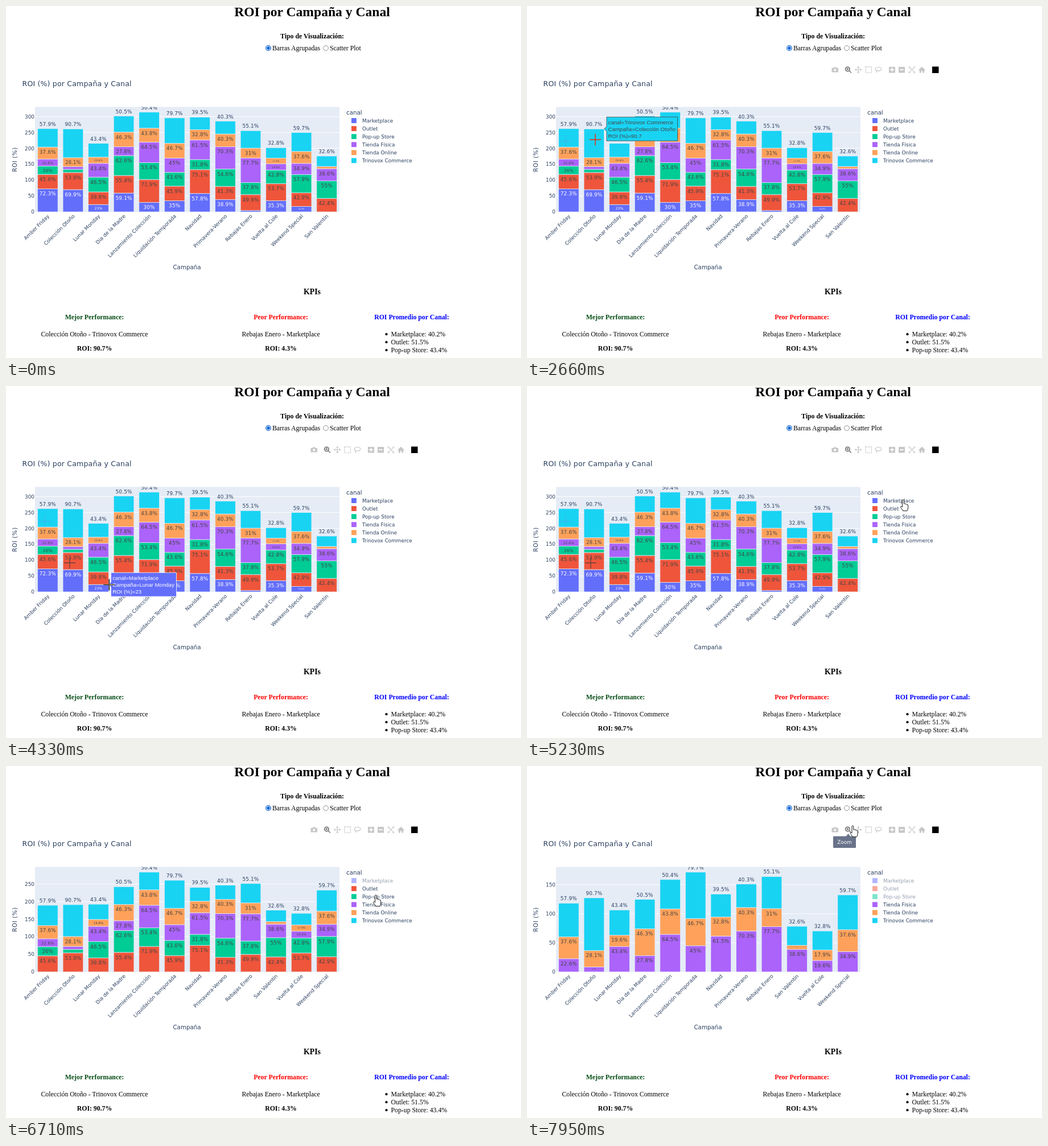
An HTML page for the animation above (8000 ms loop, 905 by 619 pixels).

```html
<!DOCTYPE html>
<html lang="es">
<head>
<meta charset="utf-8">
<title>ROI por Campaña y Canal</title>
<style>
  html, body { margin: 0; width: 100%; height: 100%; overflow: hidden; background: #fff; }
  svg { display: block; width: 905px; height: 619px; }
  .serif { font: 11.8px "Liberation Serif", serif; fill: #000; }
  .bold { font-weight: bold; }
  .h1 { font-size: 23.6px; }
  .h3 { font-size: 13.8px; }
  .plot { font: 8.85px "DejaVu Sans", sans-serif; fill: #2a3f5f; }
  .title { font-size: 12.54px; letter-spacing: .014em; }
  .axis { font-size: 10.3px; }
  .value { letter-spacing: .02em; }
  .tip { font: 9.6px "Liberation Sans", sans-serif; }
  .mid { text-anchor: middle; }
  .end { text-anchor: end; }
  #cross { mix-blend-mode: difference; }
</style>
</head>
<body>
<svg id="stage" viewBox="0 0 905 619">
  <defs><clipPath id="area"><rect x="51" y="177.5" width="535" height="184.5"/></clipPath></defs>
  <rect width="905" height="619" fill="#fff"/>

  <g class="serif">
    <text class="bold h1 mid" x="538" y="18">ROI por Campaña y Canal</text>
    <text class="bold mid" x="538" y="57">Tipo de Visualización:</text>
    <circle cx="461" cy="74" r="4.3" fill="#fff" stroke="#0b62d2" stroke-width="1.2"/>
    <circle cx="461" cy="74" r="2.7" fill="#0b62d2"/>
    <text x="468" y="78">Barras Agrupadas</text>
    <circle cx="562" cy="74" r="4.4" fill="#fff" stroke="#767676" stroke-width=".8"/>
    <text x="569" y="78">Scatter Plot</text>
    <text class="bold h3 mid" x="538" y="507">KPIs</text>
    <text class="bold mid" x="155.5" y="551" fill="#064d16">Mejor Performance:</text>
    <text class="mid" x="155.5" y="580.5">Colección Otoño - Trinovox Commerce</text>
    <text class="bold mid" x="155.5" y="606">ROI: 90.7%</text>
    <text class="bold mid" x="483" y="551" fill="#f00">Peor Performance:</text>
    <text class="mid" x="483" y="580.5">Rebajas Enero - Marketplace</text>
    <text class="bold mid" x="483" y="606">ROI: 4.3%</text>
    <text class="bold mid" x="713" y="551" fill="#00f">ROI Promedio por Canal:</text>
    <g id="means"></g>
  </g>

  <g class="plot">
    <text class="title" x="28.5" y="140.5">ROI (%) por Campaña y Canal</text>
    <text class="axis mid" x="318" y="463">Campaña</text>
    <text class="axis mid" transform="translate(18.5 270) rotate(-90)" letter-spacing=".6">ROI (%)</text>
    <text class="axis" x="598" y="191">canal</text>
  </g>
  <rect x="51" y="177.5" width="535" height="184.5" fill="#e5ecf6"/>
  <g id="charts" class="plot"></g>
  <g id="legend" class="plot"></g>

  <g fill="none" stroke-width="1.3">
    <path id="trailA" d="M58 238h20M68 228v20" stroke="#3fb4ea" stroke-dasharray="4 1.5"/>
    <path id="trailB" d="M102 311h20M112 301v20" stroke="#3c3c3c" opacity=".75"/>
  </g>

  <g id="modebar" fill="none" stroke="#444" stroke-opacity=".3" stroke-width="1.4">
    <path d="M535.5 109h3l1-1.5h3.5l1 1.5h3v7.5h-11.5z" fill="#444" fill-opacity=".3" stroke="none"/>
    <circle cx="541.2" cy="112.5" r="2.2" fill="#fff" stroke="#bbb" stroke-width="1"/>
    <g stroke-opacity=".75" stroke-width="1.7">
      <circle cx="563.4" cy="111" r="3.7"/>
      <path d="M566.2 113.8l3.6 3.8M561.6 111h3.6M563.4 109.2v3.6" stroke-width="1.4"/>
    </g>
    <path d="M577 112h10.5M582.2 106.8v10.5M580.6 108.4l1.6-1.8 1.6 1.8M580.6 115.7l1.6 1.8 1.6-1.8M578.6 110.4l-1.8 1.6 1.8 1.6M585.8 110.4l1.8 1.6-1.8 1.6" stroke-width="1.2"/>
    <rect x="595" y="107" width="10.4" height="10.4" stroke-dasharray="2 1.3"/>
    <path d="M614 113.8c-3.5-2-1.5-6.3 3.6-6.3 6.8 0 6.5 5.8 1 6.6-2 .3-4-.8-4.6-.3-.8 1.3 1.5 1.5.4 3.7" stroke-width="1.2"/>
    <g fill="#444" fill-opacity=".3" stroke="none">
      <path fill-rule="evenodd" d="M636 107h11v10.5h-11zM640.6 108.8v2.5h-2.6v1.8h2.6v2.5h1.8v-2.5h2.6v-1.8h-2.6v-2.5z"/>
      <path fill-rule="evenodd" d="M653 107h11v10.5h-11zM655.2 111.3v1.8h6.6v-1.8z"/>
      <path d="M688 112.5l6-5.7 6 5.7-1 .8-.8-.7v4.9h-3v-3.3h-2.4v3.3h-3v-4.9l-.8.7z"/>
    </g>
    <path d="M671.5 109.5v-2.5h2.5M679 107h2.5v2.5M681.5 114.8v2.5h-2.5M674 117.3h-2.5v-2.5M673 108.5l7 7.2M680 108.5l-7 7.2" stroke-width="1.2"/>
    <rect x="712" y="106.5" width="11.5" height="11.5" fill="#000" stroke="none"/>
  </g>
  <g id="zoomTip" class="plot">
    <path d="M560.5 124l4-5 4 5z" fill="#69738a"/>
    <rect x="538" y="123.5" width="40" height="20.5" rx="1.5" fill="#69738a"/>
    <text class="mid" x="558" y="137.3" style="fill:#fff">Zoom</text>
  </g>

  <g id="hover" class="tip"></g>
  <path id="cross" d="M-10 0h20M0 -10v20" stroke="#fff" stroke-width="1.5"/>
  <path id="arrow" d="M0 0v12.5l2.9-2.7 1.9 4.4 1.9-.8-1.9-4.3h4z" fill="#fff" stroke="#000" stroke-width=".8"/>
  <path id="hand" d="M-1.5 1.5q0-1.6 1.4-1.6 1.4 0 1.4 1.6v5.5q2-.8 2.6.6 2-.6 2.5.9 2.2-.4 2.2 1.6v4q0 3-1.6 5.5h-7.3q-1.2-2.5-3.6-5.3-1.4-2 .1-2.6 1-.4 2.3 1.2z" fill="#fff" stroke="#000" stroke-width=".9"/>
</svg>

<script>
const LOOP = 8000;
const LEFT = 51, TOP = 177.5, BASE = 362, STEP = 535 / 12, BAR = STEP * .8;

const channels = [
  ['Marketplace', '#636efa'], ['Outlet', '#ef553b'], ['Pop-up Store', '#00cc96'],
  ['Tienda Física', '#ab63fa'], ['Tienda Online', '#ffa15a'], ['Trinovox Commerce', '#19d3f3']
];
const campaigns = [
  ['Amber Friday', 72.3, 45.6, 26, 22.6, 37.6, 57.9],
  ['Colección Otoño', 69.9, 53.9, 10.3, 8.4, 28.1, 90.7],
  ['Lunar Monday', 23, 39.8, 46.5, 43.4, 19.6, 43.4],
  ['Día de la Madre', 59.1, 55.4, 62.6, 27.8, 46.3, 50.5],
  ['Lanzamiento Colección', 30, 71.9, 53.4, 64.5, 43.8, 50.4],
  ['Liquidación Temporada', 35, 45.9, 43.6, 45, 46.7, 79.7],
  ['Navidad', 57.8, 75.1, 31.8, 61.5, 32.8, 39.5],
  ['Primavera-Verano', 38.9, 41.3, 54.6, 70.3, 40.3, 40.3],
  ['Rebajas Enero', 4.3, 49.9, 37.8, 77.7, 31, 55.1],
  ['Vuelta al Cole', 35.3, 53.7, 42.8, 19.6, 17.9, 32.8],
  ['Weekend Special', 16.9, 42.9, 57.9, 34.9, 37.6, 59.7],
  ['San Valentín', 0, 42.4, 55, 38.6, 7.1, 32.6]
];

// Times at which the first, second and third channel get hidden.
const hideTimes = [5710, 6810, 7150];

// Bursts of pointer movement: start, end, number of steps.
const bursts = [
  [1020, 1780, 8], [1900, 1900, 1], [2540, 2660, 2], [3200, 3450, 3], [3770, 4550, 8],
  [4690, 5470, 8], [5600, 6270, 7], [6410, 6920, 6], [7150, 7950, 8]
];
// Pointer path: time, x, y.
const path = [
  [1020, 885, 12], [1350, 520, 100], [1671, 150, 215], [1780, 68, 232], [1900, 68, 239],
  [2540, 95, 238], [2660, 120, 235], [3200, 119, 262], [3450, 113, 303], [3770, 112, 311],
  [4327, 181, 349.5], [4550, 533, 338], [4690, 592, 310], [5247, 661, 200], [5470, 664, 201],
  [5600, 664, 201], [6270, 655, 213], [6410, 655, 214], [6716, 650, 227], [7150, 650, 226],
  [7950, 572.5, 105]
];

const $ = id => document.getElementById(id);

function add(parent, tag, attrs, text) {
  const node = document.createElementNS('http://www.w3.org/2000/svg', tag);
  for (const k in attrs) node.setAttribute(k, attrs[k]);
  if (text !== undefined) node.textContent = text;
  parent.append(node);
  return node;
}

const show = (node, on) => { node.style.display = on ? '' : 'none'; };

function buildChart(hidden) {
  const g = add($('charts'), 'g', {});
  const order = campaigns.slice();
  if (hidden) order.splice(9, 0, order.pop());
  const total = c => c.slice(1 + hidden).reduce((a, b) => a + b, 0);
  const range = Math.max(...order.map(total)) / .95;
  const yOf = v => BASE - v / range * (BASE - TOP);
  const segments = [];

  for (let v = 0; v < range; v += 50) {
    const y = yOf(v);
    if (v) add(g, 'path', { d: `M${LEFT} ${y}h535`, stroke: '#fff', 'stroke-width': .9 });
    add(g, 'text', { class: 'end', x: 50, y: y + 3.2 }, v);
  }
  const bars = add(g, 'g', { 'clip-path': 'url(#area)' });
  order.forEach((c, i) => {
    const mid = LEFT + STEP * (i + .5), x = mid - BAR / 2;
    let sum = 0;
    for (let k = hidden; k < 6; k++) {
      const value = c[k + 1];
      if (!value) continue;
      const bottom = yOf(sum), top = yOf(sum += value), h = bottom - top;
      add(bars, 'rect', { x, y: top, width: BAR, height: h, fill: channels[k][1], stroke: '#e5ecf6', 'stroke-width': .74 });
      segments.push({ x, top, bottom, k, name: c[0], value });
      const outside = k === 5;
      const s = outside ? 1 : Math.min(1, (h - 5.5) / 10.8);
      if (s < .08) continue;
      const y = outside ? top - 5 : top + 2.2 + 9.6 * s;
      const fill = outside ? '#2a3f5f' : k ? '#444' : '#fff';
      add(bars, 'text', { class: 'value mid', transform: `translate(${mid} ${y}) scale(${s})`, fill }, value + '%');
    }
    add(g, 'text', { class: 'end', transform: `translate(${mid + 3.5} 370.2) rotate(-45)` }, c[0]);
  });
  return { g, segments };
}

const charts = [0, 1, 2, 3].map(buildChart);

const legend = channels.map(([name, fill], i) => {
  const g = add($('legend'), 'g', {}), y = 201.5 + 14.05 * i;
  add(g, 'rect', { x: 607, y: y - 4.4, width: 8.85, height: 8.85, fill });
  add(g, 'text', { x: 626, y: y + 3.2 }, name);
  return g;
});

['Marketplace: 40.2%', 'Outlet: 51.5%', 'Pop-up Store: 43.4%'].forEach((line, i) => {
  const y = 580.5 + 14 * i;
  add($('means'), 'circle', { cx: 668.5, cy: y - 3.3, r: 2.1 });
  add($('means'), 'text', { x: 676.5, y }, line);
});

let hovered = null;
function setHover(seg) {
  if (seg === hovered) return;
  hovered = seg;
  const g = $('hover');
  g.replaceChildren();
  if (!seg) return;
  const ink = seg.k ? '#444' : '#fff';
  const x = seg.x + BAR + 4.2, y = seg.top;
  const frame = add(g, 'path', { fill: channels[seg.k][1], stroke: ink, 'stroke-width': .8 });
  const lines = ['canal=' + channels[seg.k][0], 'Campaña=' + seg.name, 'ROI (%)=' + seg.value];
  const widths = lines.map((line, i) =>
    add(g, 'text', { x: x + 2.7, y: y - 8.4 + 12.3 * i, fill: ink }, line).getComputedTextLength());
  const w = Math.max(...widths) + 6.5;
  frame.setAttribute('d', `M${x - 4.2} ${y}l4.2 -4.4v-16.6h${w}v42h${-w}v-16.6z`);
}

function snap(t) {
  const burst = bursts.filter(b => b[0] <= t).pop();
  if (!burst) return 0;
  const [from, to, n] = burst;
  if (n === 1) return from;
  const d = (to - from) / (n - 1);
  return from + d * Math.min(n - 1, Math.floor((t - from + 20) / d));
}

function pointerAt(t) {
  const i = path.findIndex(p => p[0] >= t - .01);
  if (i < 0) return path[path.length - 1].slice(1);
  if (i === 0) return path[0].slice(1);
  const [t0, x0, y0] = path[i - 1], [t1, x1, y1] = path[i];
  const f = Math.min(1, (t - t0) / (t1 - t0));
  return [x0 + (x1 - x0) * f, y0 + (y1 - y0) * f];
}

const within = (x, y, l, t, r, b) => x >= l && x <= r && y >= t && y <= b;

function render(t) {
  const state = hideTimes.filter(h => h <= t).length;
  charts.forEach((c, i) => show(c.g, i === state));
  legend.forEach((g, i) => g.setAttribute('opacity', i < state ? .5 : 1));

  const [x, y] = pointerAt(snap(t));
  const active = t >= 1020;
  const inPlot = within(x, y, LEFT, TOP, 586, BASE);
  const onLink = within(x, y, 598, 195, 716, 278) || within(x, y, 534, 103, 724, 120);
  const kind = inPlot ? 'cross' : onLink ? 'hand' : 'arrow';
  for (const id of ['cross', 'hand', 'arrow']) {
    show($(id), active && id === kind);
    $(id).setAttribute('transform', `translate(${x} ${y})`);
  }
  const seg = active && inPlot && charts[state].segments.find(s =>
    within(x, y, s.x - 2, s.top, s.x + BAR + 2, s.bottom));
  setHover(seg || null);

  show($('modebar'), t >= 880);
  show($('zoomTip'), active && within(x, y, 556, 103, 575, 120));
  show($('trailA'), t >= 2540 && !state);
  show($('trailB'), t >= 3880 && !state);
}

const start = performance.now();
function tick() {
  render((performance.now() - start) % LOOP);
  requestAnimationFrame(tick);
}
tick();
</script>
</body>
</html>
```
